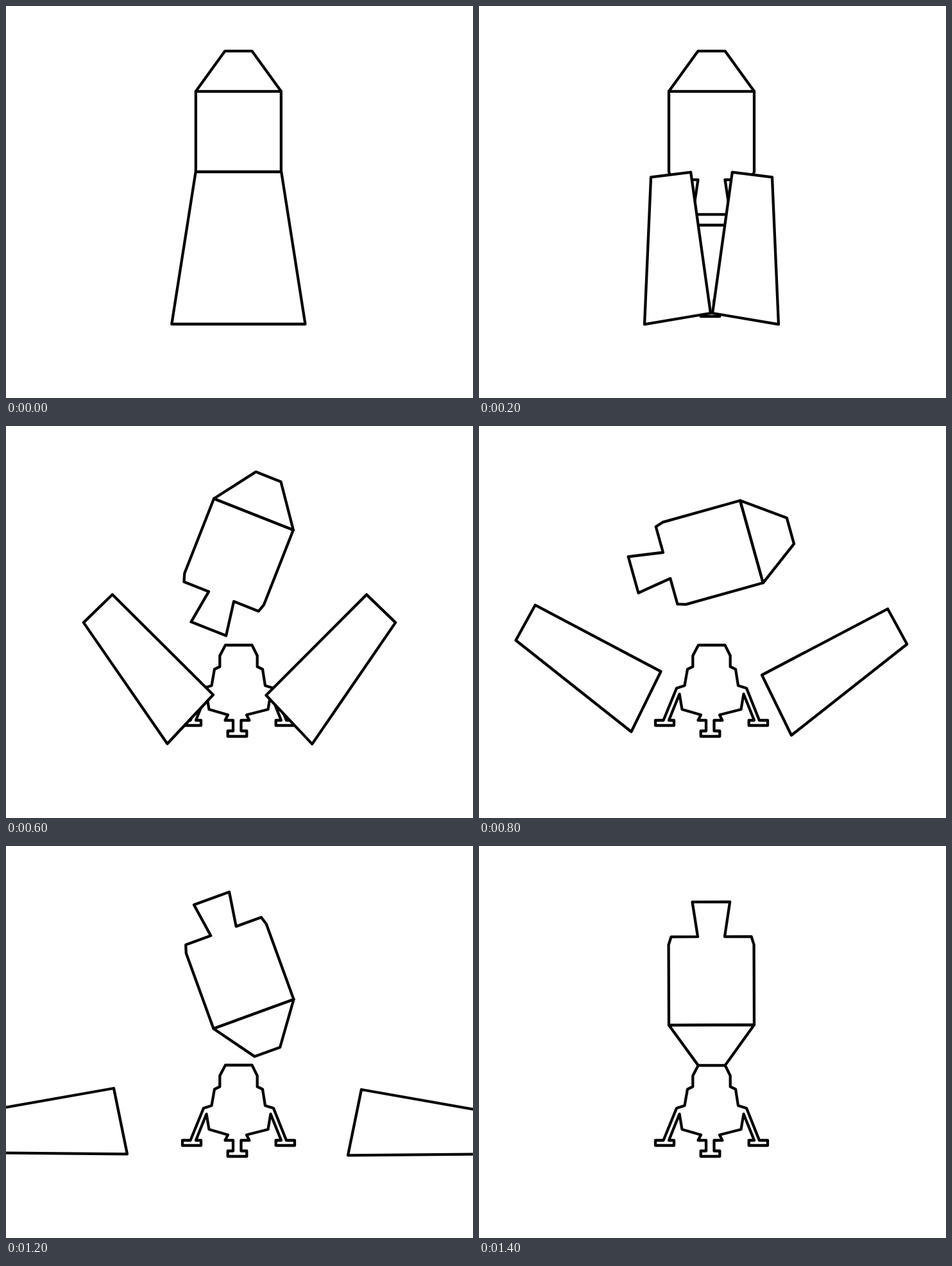
Write an HTML page that moves like this. It is 728 by 610 pixels and loops after 1600 ms.

```html
<!DOCTYPE html>
<html lang="en">
<head>
<meta charset="utf-8">
<title>Docking manoeuvre</title>
<style>
  html, body { margin: 0; width: 100%; height: 100%; overflow: hidden; background: #fff; }
  svg { display: block; width: 728px; height: 610px; }
  path { fill: #fff; stroke: #000; stroke-width: 4.3; stroke-linejoin: round; stroke-linecap: round; }
</style>
</head>
<body>
<svg viewBox="0 0 728 610">
  <path id="lander" d="M342 341H383.5L391.7 357.5V374.5L400 378.5L404 404L417 408L437 458H450V466H420.7V458H429
    L412.5 417L408.5 441L375 449.5L379.3 458H366.5V474.5H375.3V483H345.7V474.5H354V458H341.5L346 449.5
    L316.5 441L312.5 417L296 458H304V466H275V458H287.5L308 408L320.5 404L325 378.5L333.3 374.5V357.5Z"/>
  <g id="craft">
    <path d="M-66.5 0V125L-62.5 137.5H-21L-29.3 191.5H29.3L21 137.5H62.5L66.5 125V0Z"/>
    <path d="M-66.5 0L-21 -62.7H21L66.5 0Z"/>
  </g>
  <path id="fairing" d="M295.7 258H429.2L466.5 495H258.3Z"/>
  <path id="left" d="M0 0V-221.5L-62.6 -222.6L-104.4 2.9Z"/>
  <path id="right" d="M0 0V-221.5L62.6 -222.6L104.4 2.9Z"/>
</svg>
<script>
const STEP = 200;

// Each pose is x, y, rotation; a missing pose hides the part.
const poses = [
  { craft: [362.4, 132.8, 0] },
  { craft: [362.5, 132.8, 0], left: [361, 478, -8], right: [364, 478, 8] },
  { craft: [362.5, 132.8, 0], left: [353, 446, -26.6], right: [375, 447, 26.4] },
  { craft: [386, 137.4, 21.5], left: [323, 418.3, -45.2], right: [405.5, 419, 45] },
  { craft: [425, 180, 74.4], left: [283.5, 382, -62.2], right: [441, 387.5, 62.3] },
  { craft: [407, 244, 136.3], left: [230.3, 370.3, -82.7], right: [492, 373.5, 82.5] },
  { craft: [386, 261.5, 160], left: [168, 377, -100], right: [554, 379, 100] },
  { craft: [362.5, 278.6, 179.8] }
];

const byId = id => document.getElementById(id);
const show = (id, on) => byId(id).style.display = on ? "" : "none";

function place(id, pose) {
  show(id, pose);
  if (!pose) return;
  const [x, y, turn] = pose;
  byId(id).setAttribute("transform", `translate(${x} ${y}) rotate(${turn})`);
}

function draw(step) {
  show("fairing", step === 0);
  show("lander", step > 0);
  for (const id of ["craft", "left", "right"]) place(id, poses[step][id]);
}

const start = performance.now();
function tick(now) {
  draw(Math.floor(Math.max(0, now - start) / STEP) % poses.length);
  requestAnimationFrame(tick);
}
draw(0);
requestAnimationFrame(tick);
</script>
</body>
</html>
```
